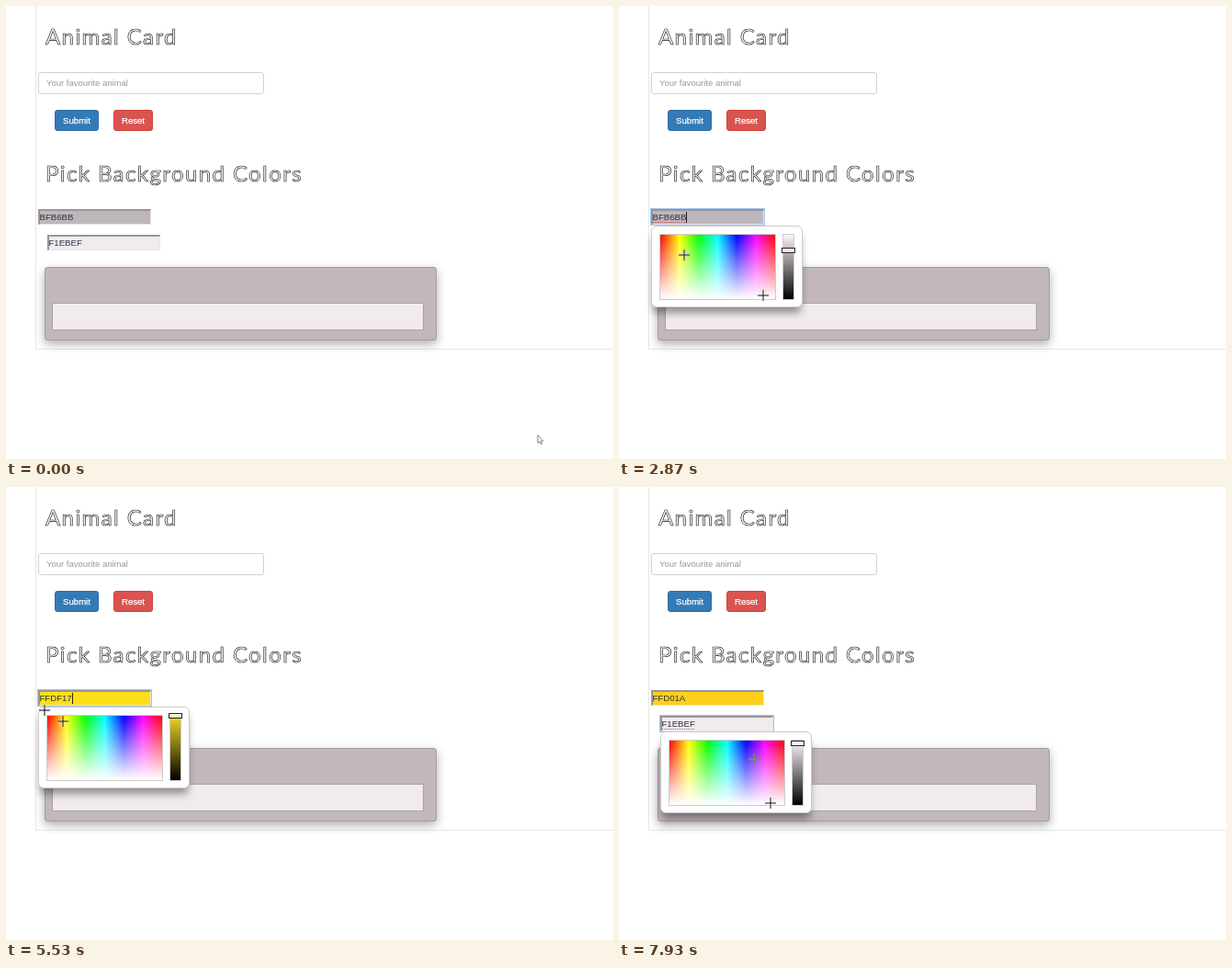
Animation, 661 px wide and 493 px high, one loop 8000 ms. Source, as an HTML page:

```html
<!DOCTYPE html>
<html lang="en">
<head>
<meta charset="utf-8">
<title>Animal Card</title>
<style>
html, body { margin: 0; width: 661px; height: 493px; overflow: hidden; background: #fff; }
#stage { position: relative; width: 661px; height: 493px; overflow: hidden; background: #fff;
  font: 9.6px/12px "Liberation Sans", Arial, sans-serif; color: #2d3340; }
#stage div, #stage span, #stage svg { position: absolute; box-sizing: border-box; white-space: nowrap; }
#frame { left: 32px; top: -2px; width: 640px; height: 376px; border: 1px solid #e6e6e6; }
.head { left: 43px; font: 24px/28.8px Lato, sans-serif; letter-spacing: 1.4px;
  color: #f4f4f4; -webkit-text-stroke: .65px #222; }
#animal { left: 35px; top: 72px; width: 246px; height: 24px; border: 1px solid #d2d2d2; border-radius: 3px;
  padding: 5px 8px; color: #999; font-size: 9.5px; }
.btn { top: 113px; height: 23px; border: 1px solid; border-radius: 3px; color: #fff;
  line-height: 21px; text-align: center; -webkit-text-stroke: .25px #fff; }
#submit { left: 53px; width: 48px; background: #337ab7; border-color: #2e6da4; }
#reset { left: 117px; width: 43px; background: #d9534f; border-color: #d43f3a; }
.field { width: 123px; height: 17px; border: 1px solid; border-width: 2px 1px 1px 2px;
  border-color: #9a9598 #e8e4e6 #e8e4e6 #9a9598; }
.field.on { box-shadow: 0 0 0 1px #9cc2f2; }
.field span { left: -.5px; top: 1.3px; border-right: 1px solid transparent; }
.field.caret span { border-right-color: #222; }
.field.spell span { background: repeating-linear-gradient(90deg, #c55 0 1px, transparent 1px 2px) 0 10.5px / 100% 1px no-repeat; }
#card { left: 42px; top: 284px; width: 427px; height: 80px; background: #c1b7bc; border: 1px solid #a39b9f;
  border-radius: 3px; box-shadow: 0 4px 11px rgba(0,0,0,.32); }
#inner { left: 7px; top: 38px; width: 405px; height: 30px; background: #f1ebef; border: 1px solid #a9a4a7; }
#picker { width: 165px; height: 89px; background: #fff; border: 1px solid #ccc; border-radius: 6px;
  box-shadow: 0 8px 9px -2px rgba(0,0,0,.4); }
#hues { left: 8px; top: 8px; width: 127px; height: 72px; border: 1px solid #ccc;
  background: linear-gradient(transparent, #fff),
    linear-gradient(90deg, red, #ff0, lime, cyan, blue, magenta, red); }
#bar { left: 142px; top: 8px; width: 13px; height: 72px; border: 1px solid #ccc; }
#knob { left: 141px; width: 15px; height: 6px; border: 1px solid #222; background: rgba(255,255,255,.65); }
svg { overflow: visible; width: 1px; height: 1px; left: 0; top: 0; fill: none; }
#cross { mix-blend-mode: difference; }
</style>
</head>
<body>
<div id="stage">
  <div id="frame"></div>
  <div class="head" style="top:18.8px">Animal Card</div>
  <div id="animal">Your favourite animal</div>
  <div id="submit" class="btn">Submit</div>
  <div id="reset" class="btn">Reset</div>
  <div class="head" style="top:167.8px">Pick Background Colors</div>
  <div id="field1" class="field" style="left:35px;top:221px"><span></span></div>
  <div id="field2" class="field" style="left:45px;top:249px"><span></span></div>
  <div id="card"><div id="inner"></div></div>
  <div id="picker">
    <div id="hues"></div><div id="bar"></div><div id="knob"></div>
    <svg id="mark"><path d="M-6 0H6M0-6V6" stroke="#fff" stroke-opacity=".6" stroke-width="3"/>
      <path d="M-6 0H6M0-6V6" stroke="#111"/></svg>
  </div>
  <svg id="arrow"><path d="M0 0V8.6L2 6.9L3.4 10L4.8 9.4L3.5 6.4H6Z" fill="#fff" stroke="#555" stroke-width=".7"/></svg>
  <svg id="beam"><path d="M-1.5-4H1.5M0-4V4M-1.5 4H1.5" stroke="#666" stroke-width=".8"/></svg>
  <svg id="cross"><path d="M-6 0H6M0-6V6" stroke="#fff"/></svg>
</div>
<script>
const $ = id => document.getElementById(id);
const LOOP = 8000, TICK = 200 / 3;

// Pointer path: time, x, y, shape
const path = [
  [0, 578, 466, 'arrow'], [67, 578, 466, 'arrow'], [400, 300, 300, 'arrow'], [670, 90, 203, 'arrow'],
  [800, 53, 209, 'arrow'], [870, 56, 218, 'beam'], [1000, 60, 229, 'beam'], [1130, 56, 218, 'beam'],
  [1404, 56, 218, 'beam'], [1600, 75, 245, 'cross'], [1870, 120, 300, 'cross'], [2070, 146, 306, 'cross'],
  [2140, 152, 292, 'arrow'], [2270, 162, 253, 'arrow'], [2337, 162, 253, 'arrow'], [2530, 183, 262, 'arrow'],
  [2600, 150, 290, 'cross'], [2670, 130, 306, 'cross'], [2870, 70, 270, 'cross'], [3000, 39, 228, 'cross'],
  [3070, 41, 241, 'cross'], [6140, 41, 242, 'cross'], [6336, 146, 246, 'arrow'], [6470, 164, 251, 'arrow'],
  [6670, 215, 266, 'arrow'], [6870, 256, 290, 'arrow'], [7000, 208, 268, 'arrow'],
  [7270, 110, 248, 'beam'], [7530, 100, 252, 'beam'], [7670, 95, 262, 'cross'], [7870, 89, 259, 'cross'],
  [7936, 146, 295, 'cross']
];

// Values of the first field: time, colour
const picks = [
  [0, 'BFB6BB'], [3200, 'FFCB15'], [3330, 'FFCF15'], [3400, 'FFD315'], [3530, 'FFD717'],
  [3930, 'FFD919'], [4070, 'FFDB17'], [5200, 'FFDD17'], [5470, 'FFDF17'], [5670, 'FFDB18'],
  [5740, 'FFD71A'], [5870, 'FFD01A']
];

const lastAt = (list, t) => list.findLastIndex(k => k[0] <= t);

function toHsv(hex) {
  const [r, g, b] = hex.match(/../g).map(h => parseInt(h, 16));
  const max = Math.max(r, g, b), d = max - Math.min(r, g, b);
  const h = max === r ? (g - b) / d : max === g ? 2 + (b - r) / d : 4 + (r - g) / d;
  return { h: (h * 60 + 360) % 360, s: d / max, v: max / 255 };
}

function place(el, x, y) {
  el.style.left = x + 'px';
  el.style.top = y + 'px';
}

function setField(el, hex, on, caret, spell) {
  el.firstChild.textContent = hex;
  el.style.background = '#' + hex;
  el.className = 'field' + (on ? ' on' : '') + (caret ? ' caret' : '') + (spell ? ' spell' : '');
}

function setPicker(x, y, hex) {
  const c = toHsv(hex);
  place($('picker'), x, y);
  place($('mark'), Math.floor(8.5 + c.h / 360 * 125) - .5, Math.round(8.5 + (1 - c.s) * 70) - .5);
  $('knob').style.top = Math.round(5.5 + (1 - c.v) * 70) + 'px';
  $('bar').style.background = `linear-gradient(hsl(${c.h} 90% ${100 - c.s * 50}%), #000)`;
}

function setPointer(t) {
  const i = lastAt(path, t), a = path[i], b = path[i + 1] || a;
  const f = b === a ? 0 : (t - a[0]) / (b[0] - a[0]);
  const x = Math.round(a[1] + (b[1] - a[1]) * f), y = Math.round(a[2] + (b[2] - a[2]) * f);
  for (const id of ['arrow', 'beam', 'cross']) {
    $(id).style.display = id === a[3] ? 'block' : 'none';
  }
  place($(a[3]), x + .5, y + .5);
}

function draw(time) {
  const t = Math.floor((time % LOOP + 5) / TICK) * TICK + 4;
  const hex1 = picks[lastAt(picks, t)][1], hex2 = 'F1EBEF';
  const open1 = t >= 1330 && t < 6870, open2 = t >= 7530;
  const dragging = t >= 3200 && t < 6200;
  setField($('field1'), hex1, open1, open1 && t < 6200, open1 && !dragging);
  setField($('field2'), hex2, open2, false, open2);
  $('picker').style.display = open1 || open2 ? 'block' : 'none';
  if (open1) setPicker(35, 239, hex1);
  if (open2) setPicker(45, 266, hex2);
  setPointer(t);
}

const start = performance.now();
function loop() {
  draw(performance.now() - start);
  requestAnimationFrame(loop);
}
loop();
</script>
</body>
</html>
```
